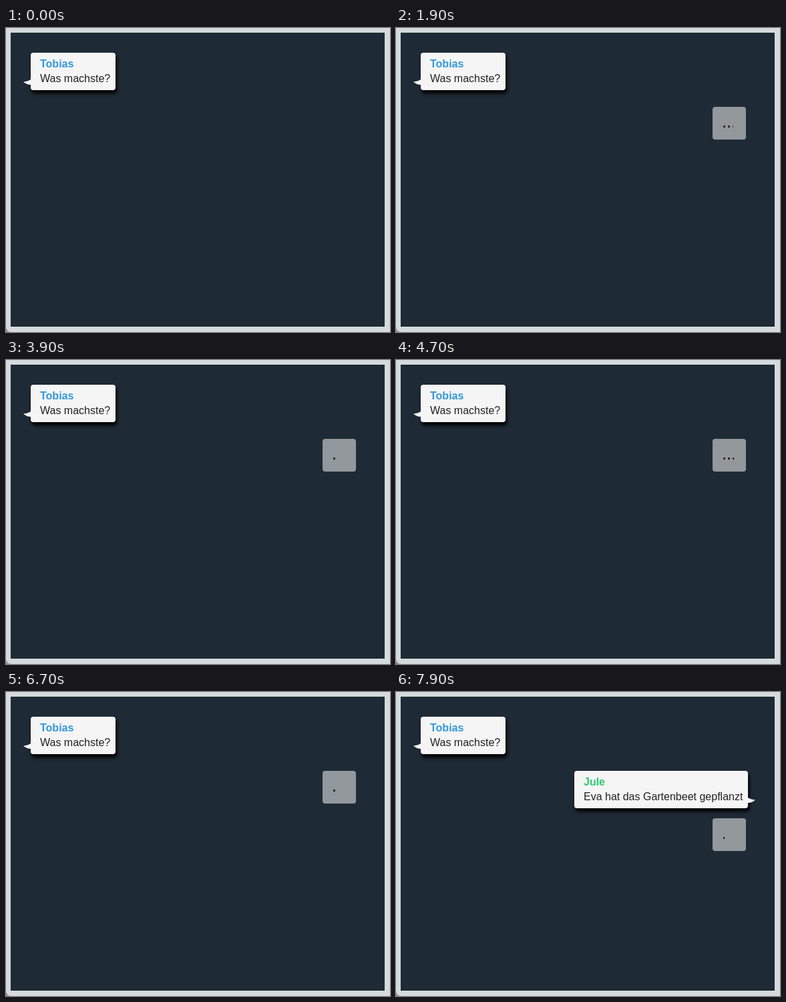
Write an HTML page with a canvas that moves like this. It is 575x455 px and loops after 8000 ms.

```html
<!DOCTYPE html>
<html lang="de">
<head>
<meta charset="utf-8">
<title>Chat</title>
<style>
  html, body { margin: 0; width: 575px; height: 455px; overflow: hidden; }
  canvas { position: absolute; left: 0; top: 0; }
  .msg {
    position: absolute;
    font: 16px/22px "Liberation Sans", Arial, sans-serif;
    color: #222;
    white-space: nowrap;
  }
  .msg b { display: block; }
</style>
</head>
<body>
<canvas id="stage" width="575" height="455"></canvas>
<div class="msg" style="left:51px;top:43px"><b style="color:#3498db">Tobias</b>Was machste?</div>
<div class="msg" id="reply" style="left:281px;top:124px;visibility:hidden"><b style="color:#2ecc71">Jule</b>Eva hat das Gartenbeet gepflanzt</div>
<script>
const ctx = document.getElementById("stage").getContext("2d");
const reply = document.getElementById("reply");

const LOOP = 8000, TICK = 100;
const TYPING_AT = 100, REPLY_AT = 6800;
// Dots are uncovered from left to right, then all vanish at once.
const CYCLE = 1370, CYCLE_START = 755, FIRST_DOT = 185, DOT_GAP = 455, COLUMN = 92;
const INK = ["#5a4030", "#000", "#28384e"];

function box(x, y, w, h, fill, r = 4) {
  ctx.fillStyle = fill;
  ctx.beginPath();
  ctx.roundRect(x, y, w, h, r);
  ctx.fill();
}

function bubble(x, y, w, side) {
  ctx.save();
  ctx.shadowColor = "#000";
  ctx.shadowOffsetX = 2;
  ctx.shadowOffsetY = 5;
  ctx.shadowBlur = 5;
  box(x, y, w, 56, "#f5f5f5");
  ctx.restore();

  // Curved tail, mirrored for the right side.
  ctx.save();
  ctx.translate(side < 0 ? x : x + w, y);
  ctx.scale(side, 1);
  ctx.beginPath();
  ctx.moveTo(-1, 39.5);
  ctx.quadraticCurveTo(4, 43, 11, 43.5);
  ctx.quadraticCurveTo(6, 48, -1, 48);
  ctx.fillStyle = "#f5f5f5";
  ctx.fill();
  ctx.restore();
}

function typing(y, t) {
  box(474, y, 50, 49, "#92989b");
  const phase = (t - CYCLE_START + CYCLE) % CYCLE;
  for (let dot = 0; dot < 3; dot++) {
    for (let col = 0; col < 3; col++) {
      if (phase < FIRST_DOT + dot * DOT_GAP + col * COLUMN) continue;
      ctx.fillStyle = INK[col];
      ctx.fillRect(490 + dot * 7 + col, y + 28, 1, 3);
    }
  }
}

function draw(t) {
  ctx.fillStyle = "#8f9294";
  ctx.fillRect(0, 0, 575, 455);
  box(0, 0, 575, 455, "#d5dadc", [0, 0, 0, 8]);
  ctx.fillStyle = "#1e2a35";
  ctx.fillRect(7, 7, 560, 440);

  const replied = t >= REPLY_AT;
  bubble(37, 37, 127, -1);
  if (replied) bubble(267, 118, 260, 1);
  if (t >= TYPING_AT) typing(replied ? 189 : 118, t);
  reply.style.visibility = replied ? "visible" : "hidden";
}

const start = performance.now();
function frame() {
  const t = (performance.now() - start) % LOOP;
  draw(Math.floor(t / TICK) * TICK);
  requestAnimationFrame(frame);
}
frame();
</script>
</body>
</html>
```
